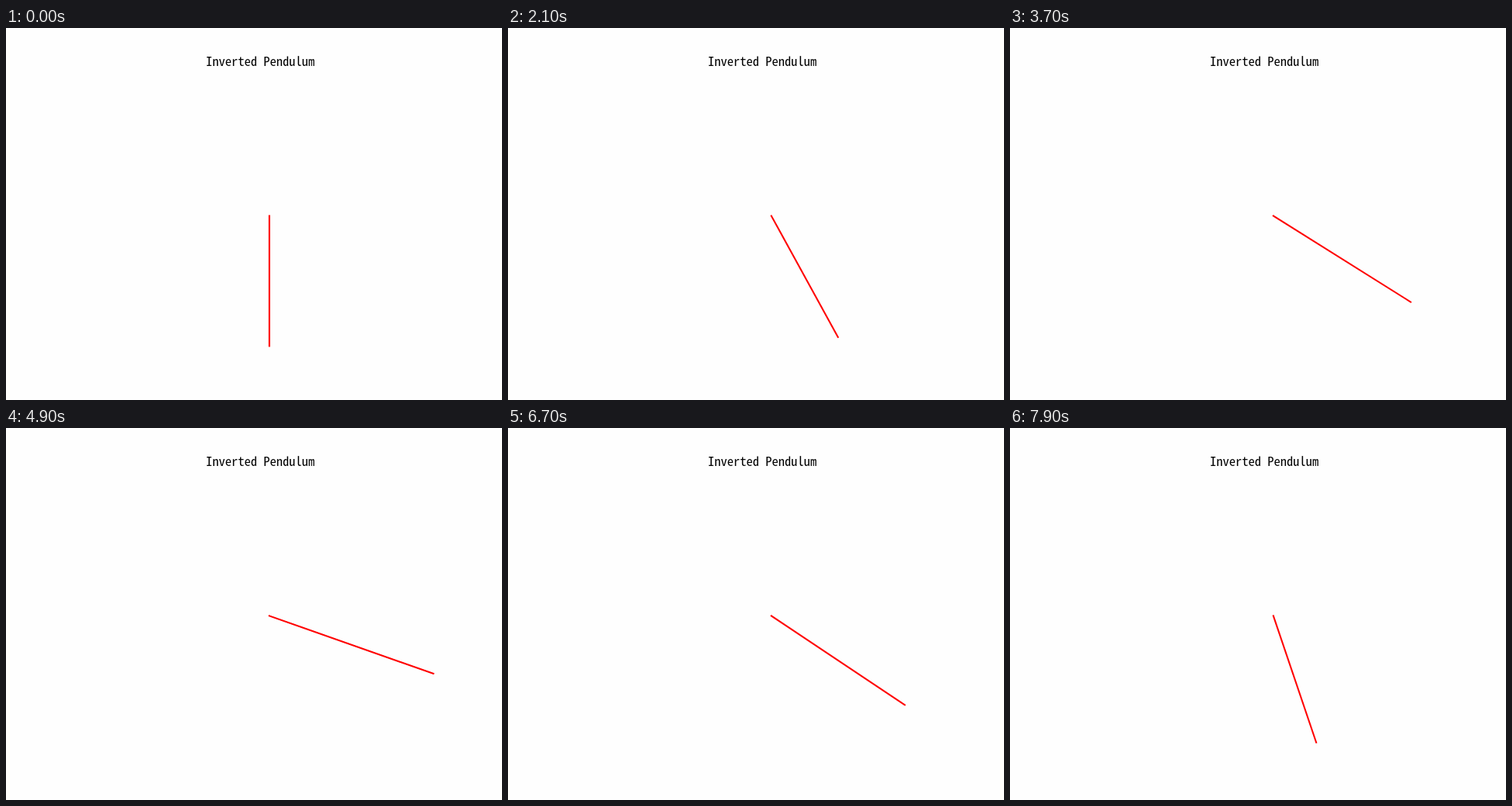
An HTML page that plays this animation: 640x480 px, repeating every 8000 ms.

```html
<!DOCTYPE html>
<html lang="en">
<head>
<meta charset="utf-8">
<title>Inverted Pendulum</title>
<style>
  html, body { margin: 0; width: 100%; height: 100%; overflow: hidden; background: #fefefe; }
  svg { display: block; }
  text { font: 300 16.5px "Noto Sans Mono CJK SC", "Noto Sans Mono CJK JP", "Noto Sans Mono", monospace; }
</style>
</head>
<body>
<svg width="640" height="480" viewBox="0 0 640 480">
  <text x="328.2" y="49" text-anchor="middle">Inverted Pendulum</text>
  <line id="rod" stroke="#f00" stroke-width="2.08" stroke-linecap="square"/>
</svg>
<script>
const LOOP = 8000, STEP = 100;

// plot area with x from -1.1 to 1 and y from -1.1 to 1.1
const toX = x => 80 + 496 * (x + 1.1) / 2.1;
const toY = y => 57.6 + 369.6 * (1.1 - y) / 2.2;

// start, rise, climb, turning point and fall of the swing
const swing = [
  { t: 0, angle: 0, speed: 1 },
  { t: 1.8, angle: 16.9, speed: 14 },
  { t: 3.7, angle: 48.6, speed: 16.5 },
  { t: 5.15, angle: 64.3, speed: 0 },
  { t: 7.9, angle: 13.55, speed: -33.3 }
];

// cubic Hermite curve through the key poses, in degrees
function angleAt(t) {
  const i = Math.max(1, swing.findIndex(key => key.t >= t));
  const a = swing[i - 1], b = swing[i];
  const d = b.t - a.t, s = (t - a.t) / d, r = 1 - s;
  return r * r * (1 + 2 * s) * a.angle + s * s * (1 + 2 * r) * b.angle
    + d * s * r * (r * a.speed - s * b.speed);
}

const rod = document.getElementById("rod");
rod.setAttribute("x1", toX(0));
rod.setAttribute("y1", toY(0));

function draw(now) {
  const t = Math.floor(now % LOOP / STEP) * STEP / 1000;
  const angle = angleAt(t) * Math.PI / 180;
  rod.setAttribute("x2", toX(Math.sin(angle)));
  rod.setAttribute("y2", toY(-Math.cos(angle)));
  requestAnimationFrame(() => draw(performance.now() - start));
}

const start = performance.now();
draw(0);
</script>
</body>
</html>
```
